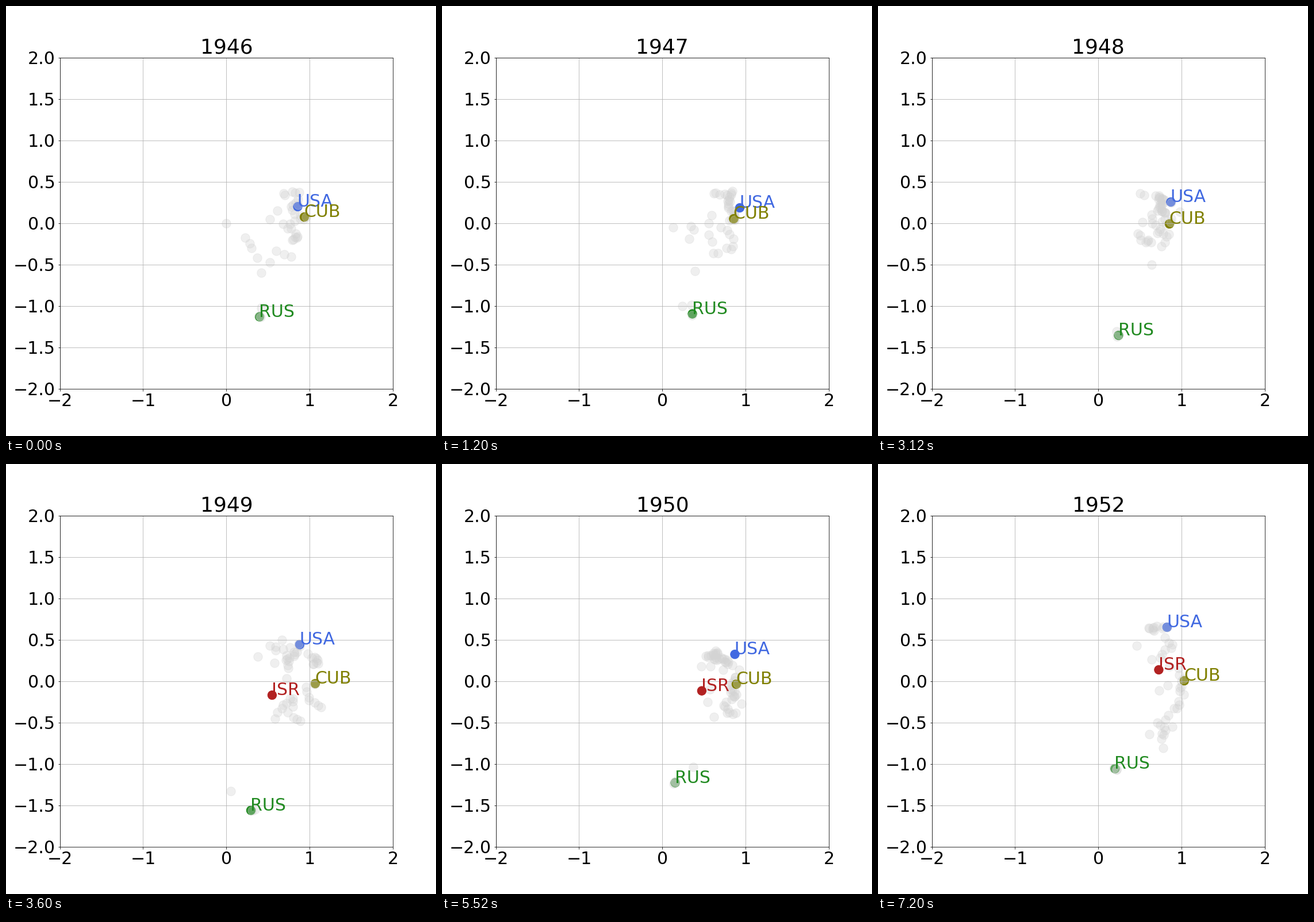
A matplotlib script that plays this animation: 748 by 748 pixels, repeating every 8 s.

```python
import numpy as np
import matplotlib.pyplot as plt
from matplotlib.animation import FuncAnimation

SIZE, DPI = 748, 72
FIRST_YEAR = 1946
COLORS = {"USA": "royalblue", "CUB": "olive",
          "RUS": "forestgreen", "ISR": "firebrick"}

years = []


def trail(rng, steps, *corners):
    """Dots along a path, steps per leg; a single step means bare corners."""
    legs = len(corners) - 1
    t = np.linspace(0, legs, legs * steps + 1)
    x, y = np.transpose(corners)
    dots = np.column_stack([np.interp(t, range(legs + 1), axis)
                            for axis in (x, y)])
    jitter = 0.025 if steps > 1 else 0
    return dots + rng.uniform(-jitter, jitter, dots.shape)


def veil(rng, x, y, n):
    """Grey dots that lie on top of a marked one."""
    return np.array([x, y]) + rng.uniform(-0.02, 0.02, (n, 2))


def add_year(marks, *trails):
    """Marks are (x, y, number of grey dots on top)."""
    rng = np.random.default_rng(len(years))
    spots = {code: mark[:2] for code, mark in marks.items()}
    crowd = np.vstack([trail(rng, *t) for t in trails])
    cover = np.vstack([veil(rng, *mark) for mark in marks.values()])
    years.append((spots, crowd, cover))


add_year({"USA": (.857, .199, 1), "CUB": (.936, .074, 1),
          "RUS": (.398, -1.131, 2)},
         (4, (.68, .37), (.87, .35), (.76, .20), (.92, .05), (.70, -.02),
          (.85, -.15), (.81, -.22)),
         (2, (.21, -.16), (.31, -.28), (.43, -.58), (.62, -.34), (.79, -.43)),
         (1, (0, 0), (.52, .05), (.61, .15), (.42, -1.02)))

add_year({"USA": (.929, .185, 0), "CUB": (.856, .053, 1),
          "RUS": (.360, -1.096, 1)},
         (6, (.62, .34), (.85, .37), (.77, .22), (.88, .10), (.82, .02)),
         (2, (.58, .08), (.57, -.12), (.59, -.36), (.76, -.31), (.86, -.29),
          (.82, -.13), (.70, -.03)),
         (1, (.13, -.05), (.34, -.04), (.32, -.19), (.38, -.08), (.39, -.58),
          (.24, -1.0), (.35, -.99)))

add_year({"USA": (.870, .255, 1), "CUB": (.853, -.009, 1),
          "RUS": (.242, -1.356, 2)},
         (7, (.70, .34), (.78, .28), (.73, .17), (.79, .12)),
         (3, (.63, .11), (.68, -.02), (.87, .04), (.70, -.10), (.85, -.14),
          (.75, -.28)),
         (3, (.45, -.11), (.57, -.23), (.65, -.21)),
         (1, (.50, .36), (.55, .34), (.53, .01), (.64, -.50), (.98, .14),
          (.22, -1.31)))

add_year({"USA": (.880, .442, 1), "CUB": (1.067, -.030, 1),
          "ISR": (.549, -.169, 0), "RUS": (.294, -1.561, 1)},
         (2, (.54, .44), (.61, .38), (.75, .43)),
         (4, (.75, .16), (.72, .28), (.82, .31), (.89, .43)),
         (4, (.99, .32), (1.10, .24), (1.03, .22)),
         (3, (.94, -.06), (1.01, -.24), (1.12, -.30)),
         (3, (.56, -.46), (.70, -.28), (.82, -.20), (.75, -.38), (.88, -.49)),
         (1, (.38, .30), (.58, .22), (.67, .50), (.72, .03), (.05, -1.33),
          (.34, -1.55)))

add_year({"USA": (.870, .324, 0), "CUB": (.887, -.037, 1),
          "ISR": (.473, -.117, 0), "RUS": (.153, -1.228, 3)},
         (6, (.50, .30), (.64, .35), (.62, .27), (.74, .26), (.82, .20)),
         (6, (.86, .07), (.82, -.10), (.88, -.18)),
         (3, (.88, -.20), (.74, -.29), (.80, -.37), (.87, -.38)),
         (1, (.47, .18), (.58, .18), (.73, .14), (.92, .14), (.95, -.27),
          (.54, -.25), (.62, -.43), (.57, -.10), (.37, -1.04)))

add_year({"USA": (.563, .154, 3), "CUB": (.577, -.009, 3),
          "ISR": (.442, -.009, 1), "RUS": (.211, -.533, 2)},
         (7, (.46, .16), (.56, .16), (.48, .06), (.58, .02), (.53, -.07),
          (.59, -.12)),
         (4, (.25, -.15), (.32, -.20), (.45, -.18)),
         (1, (.26, .08), (.32, .13), (.50, -.20), (.65, -.04), (.43, -.04)))

add_year({"USA": (.825, .651, 1), "CUB": (1.032, .005, 1),
          "ISR": (.725, .137, 0), "RUS": (.200, -1.058, 3)},
         (4, (.60, .65), (.66, .63), (.79, .65)),
         (2, (.78, .53), (.90, .44), (.82, .36), (.74, .29)),
         (3, (.97, .14), (.98, -.06), (1.01, -.18), (.93, -.34)),
         (3, (.93, -.35), (.72, -.50), (.80, -.60), (.74, -.70)),
         (1, (.46, .43), (.64, .26), (.73, -.11), (.83, -.05), (.85, .18),
          (.89, -.55), (.61, -.64), (.78, -.81)))

plt.rcParams.update({"font.family": "DejaVu Sans", "font.size": 30,
                     "ytick.major.pad": 4.2, "axes.titlepad": 6.7})
fig = plt.figure(figsize=(SIZE / DPI, SIZE / DPI), dpi=DPI)
ax = fig.add_axes([0.125, 0.11, 0.775, 0.77])
ax.set(xlim=(-2, 2), ylim=(-2, 2), xticks=range(-2, 3),
       yticks=np.arange(-2, 2.1, 0.5))
ax.grid(True)
title = ax.set_title("")


def scatter(**style):
    return ax.scatter([], [], s=235, **style)


below = scatter(color="lightgray", alpha=0.35)
marked = scatter()
above = scatter(color="lightgray", alpha=0.35)
labels = {code: ax.text(0, 0, code, color=c) for code, c in COLORS.items()}


def draw(i):
    n = i // 3
    spots, crowd, cover = years[n]
    title.set_text(str(FIRST_YEAR + n))
    below.set_offsets(crowd)
    marked.set_offsets(list(spots.values()))
    marked.set_color([COLORS[code] for code in spots])
    above.set_offsets(cover)
    for code, label in labels.items():
        label.set_visible(code in spots)
        if code in spots:
            x, y = spots[code]
            label.set_position((x - 0.006, y))
    return [title, below, marked, above, *labels.values()]


# Each year holds for three steps of 400 ms, the last one for two.
anim = FuncAnimation(fig, draw, frames=20, interval=400,
                     init_func=lambda: draw(0), repeat=True, repeat_delay=0)
plt.show()
```
